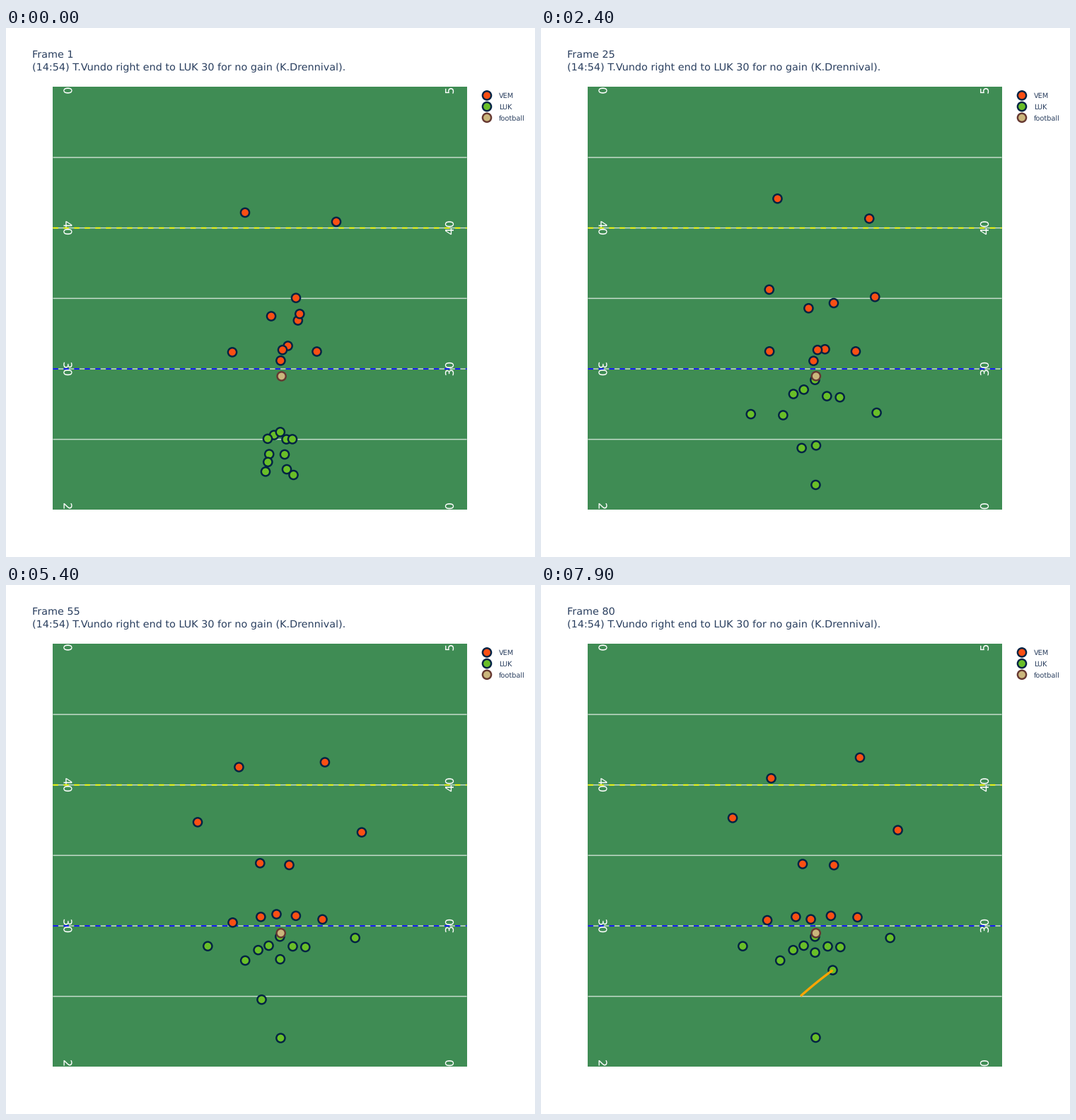
A matplotlib script that plays this animation: 748 px wide and 748 px high, repeating every 8 s.

```python
import numpy as np
import matplotlib.pyplot as plt
from matplotlib.animation import FuncAnimation
from matplotlib.patches import Circle, PathPatch, Rectangle
from matplotlib.textpath import TextPath
from matplotlib.transforms import Affine2D

SIZE, DPI = 748, 68
PT = 72 / DPI  # points per pixel
FRAMES, STEP = 80, 100
MOTION_START = 68

INK = "#2a3f5f"
LEFT, TOP, WIDTH, GAP = 66.4, 83.4, 585.2, 99.65
PLAY = "(14:54) T.Vundo right end to LUK 30 for no gain (K.Drennival)."

plt.rcParams.update({"font.family": "DejaVu Sans", "text.hinting": "none"})
clock = np.arange(FRAMES)[:, None]


def progress(begin, end):
    return np.clip((clock - begin) / (end - begin), 0, 1)


def drift(start, *legs):
    """Add eased shifts (begin, end, dx, dy) to a point or a track."""
    track = np.zeros((FRAMES, 2)) + start
    for begin, end, dx, dy in legs:
        u = progress(begin, end)
        track += u * u * (3 - 2 * u) * np.array([dx, dy])
    return track


def walk(start, spot, frames, bend=None):
    """Leave the huddle for a spot, slowing down, on a curve pulled to bend."""
    start, spot = np.array(start), np.array(spot)
    bend = (start + spot) / 2 if bend is None else np.array(bend)
    e = 1 - (1 - progress(0, frames)) ** 2
    return (1 - e) ** 2 * start + 2 * e * (1 - e) * bend + e * e * spot


def go_in_motion(track):
    """Pick up speed to the right and curve slightly off the first heading."""
    d = 4.25 * np.log1p(np.exp(clock - MOTION_START + 1))
    return track + np.hstack([d, -0.91 * d + 0.0018 * d * d])


safeties = [
    drift((338, 261), (0, 30, -4, -22), (34, 72, -8.5, 34.3)),
    drift((467, 274), (16, 46, -17, 0), (10, 62, 1, -25), (71, 79, 0, -5)),
]
corners = [
    drift((410, 381.7), (0, 32, -100, -14), (18, 54, -39, 0), (24, 64, 0, -38.3)),
    drift((415.3, 404.3), (0, 34, 72, 0), (0, 22, 0, -24), (28, 60, 17.3, -33.7)),
]
backers = [
    drift((375, 407.5), (0, 14, 6.5, -3.5), (16, 34, -7.5, -18.5),
          (32, 56, -15, 8), (58, 80, 11, 1)),
    drift((412.8, 413.5), (0, 33, 1.4, -30), (33, 56, -14, 12.7), (68, 79, 14, 0)),
]
rushers = [
    drift((398.6, 449.5), (17, 38, 11.3, 18.3)),
    drift((391, 455.2), (32, 54, -8.5, 10.3), (56, 72, -1, 7.2)),
    drift((388.4, 470.3), (16, 34, -7.3, 1), (32, 50, -20.8, -2)),
    drift((320, 458.4), (0, 14, 3.5, -4.4), (16, 50, -3, 23.3), (54, 72, -0.5, -3.3)),
    drift((439.5, 457.5), (0, 16, 5.2, -2), (18, 48, 2.8, 17.3), (54, 72, 0, -3)),
]

linemen = [
    walk((379, 575.6), (371.5, 510), 28),
    walk((387.8, 571.3), (387.4, 497.2), 26),
    walk((370, 580.8), (356.6, 516.2), 28),
    walk((396.5, 581.6), (405.5, 511), 38),
    walk((405, 581.4), (423.3, 512), 38, bend=(422, 550)),
]
receivers = [
    walk((367, 627.3), (285.3, 510.7), 40, bend=(320, 631)),
    walk((372.2, 602.6), (338.2, 531), 36, bend=(357, 610)),
    walk((397, 624), (493.7, 499), 44, bend=(448, 620)),
]
passer = drift(walk((394, 603), (389, 592), 16), (20, 64, -1.5, -72.3))
runner = drift(walk((406.5, 632), (388.4, 646), 22), (30, 60, 0, -6))
mover = go_in_motion(walk((370.3, 613.7), (361.5, 586.3), 44, bend=(382, 606)))
ball = drift((389.6, 492.4), (0, 33, -0.9, -0.2))

TEAMS = [
    ("VEM", "#fb4f14", "#002244", safeties + backers + corners + rushers),
    ("LUK", "#69be28", "#002244", linemen + receivers + [passer, mover, runner]),
    ("football", "#cbb67c", "#663831", [ball]),
]

fig = plt.figure(figsize=(SIZE / DPI, SIZE / DPI), dpi=DPI, facecolor="white")
ax = fig.add_axes([0, 0, 1, 1])
ax.set(xlim=(0, SIZE), ylim=(SIZE, 0))
ax.axis("off")


def label(x, y, text, size):
    return ax.text(x, y, text, fontsize=size * PT, color=INK, va="baseline")


def dot(xy, fill, edge, z):
    return ax.add_patch(Circle(xy, 6.1, fc=fill, ec=edge, lw=2.4 * PT, zorder=z))


def yard_line(y, color, **kw):
    ax.plot([LEFT, LEFT + WIDTH], [y, y], color=color, snap=False,
            solid_capstyle="butt", dash_capstyle="butt", **kw)


def yard_mark(x, y, text, turn):
    shape = TextPath((0, 0), text, size=16.3)
    box = shape.get_extents()
    place = (Affine2D().translate(-(box.x0 + box.x1) / 2, -(box.y0 + box.y1) / 2)
             .scale(1, -1).rotate_deg(turn).translate(x, y))
    mark = PathPatch(place.transform_path(shape), fc="white", lw=0, zorder=3)
    ax.add_patch(mark).set_clip_path(field)


# Field
field = Rectangle((LEFT, TOP), WIDTH, 6 * GAP, fc="#3f8c54", ec="none", zorder=0)
ax.add_patch(field)
for k in range(1, 6):
    yard_line(TOP + k * GAP, "white", lw=1.5 * PT, alpha=0.7, zorder=1)
for k, color in ((2, "yellow"), (4, "blue")):
    yard_line(TOP + k * GAP, color, lw=1.7 * PT, ls=(0, (4.4, 4.4)), zorder=2)
for k in range(4):
    for x, turn in ((87.4, 90), (627, -90)):
        yard_mark(x, TOP + 2 * k * GAP, str(50 - 10 * k), turn)

# Titles and legend
counter = label(37, 41.3, "", 14.4)
label(37, 60, PLAY, 14.4)
players = []
for k, (name, fill, edge, tracks) in enumerate(TEAMS):
    y = 95.4 + 15.7 * k
    dot((680, y), fill, edge, 4)
    label(696.8, y + 3.6, name, 9.8)
    players += [(dot(t[0], fill, edge, 5 + k), t) for t in tracks]
trail, = ax.plot([], [], color="orange", lw=3.3 * PT, zorder=9,
                 solid_capstyle="butt")


def draw(i):
    counter.set_text(f"Frame {i + 1}")
    for mark, track in players:
        mark.set_center(track[i])
    trail.set_data(*mover[MOTION_START:i + 1].T)
    return [counter, trail] + [mark for mark, _ in players]


anim = FuncAnimation(fig, draw, frames=FRAMES, interval=STEP, repeat=True,
                     repeat_delay=0, blit=False)
plt.show()
```
